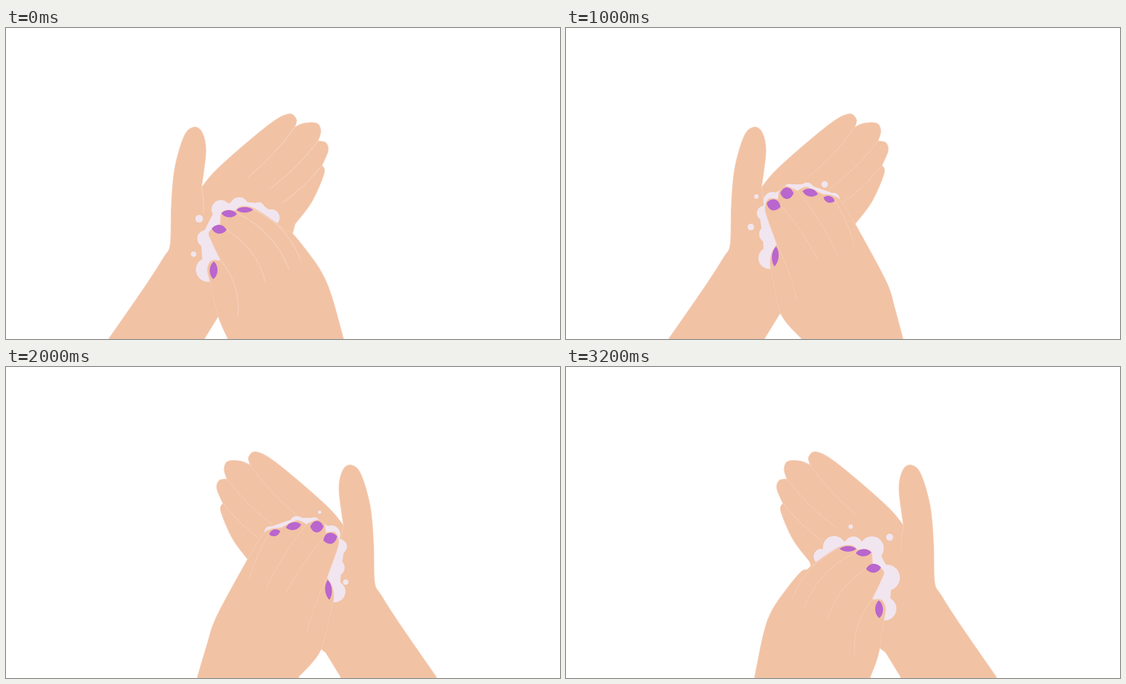
Recreate the animation shown at these times as an HTML page with a canvas. Size 998 px wide and 561 px high, loop 3400 ms.

```html
<!DOCTYPE html>
<html lang="en">
<head>
<meta charset="utf-8">
<title>Washing hands</title>
<style>
html, body { margin: 0; width: 100%; height: 100%; overflow: hidden; background: #fff; }
canvas { display: block; width: 998px; height: 561px; }
</style>
</head>
<body>
<canvas id="stage" width="998" height="561"></canvas>
<script>
const ctx = document.getElementById('stage').getContext('2d');
const SKIN = '#f1c2a3', LINE = '#f4cbb4', FOAM = '#f1e5ef', NAIL = '#b966ce';
const STEP = 200, MIRROR = 960, FLOOR = 575;

// Outlines are smooth curves through key points; "|" marks a sharp corner.
const palm = {
  outline: '185,561|252,464 284,414 296,390 298,320 304,253 321,195 338,179 353,188 360,222 352,288|' +
    '378,257 435,206 484,167 511,155 523,165 520,179|537,172 560,172 567,186 562,204|' +
    '576,207 580,222 569,248|573,262 551,313 521,353|490,430 384,517|357,561',
  lines: [[352, 288, 356, 333], [520, 179, 437, 268], [562, 204, 474, 291], [569, 248, 499, 315]]
};

// nails: x, y, angle, length, width; lines: start and end; blobs: foam centres
const bent = {
  outline: '400,561 382,519 367,455 363,437 367,423 375,419 388,421|372,388 366,368 386,354|' +
    '388,334 398,329 413,330|424,322 448,326 490,354 504,366|514,369 540,400 568,440 586,482 608,561',
  nails: [[374, 437, 1.6, 32, 14], [384, 363, .1, 27, 16], [402, 335, .05, 28, 13], [430, 328, 0, 30, 10]],
  lines: [[388, 421, 418, 519], [397, 364, 467, 457], [416, 334, 510, 436], [447, 328, 530, 417]],
  bulge: .2,
  blobs: [[364, 436], [360, 380], [387, 327], [420, 322], [455, 325], [478, 342]]
};
const flat = {
  outline: '425,561 388,517 372,450 368,428 370,408 380,390|362,340 359,322 366,308 382,309|' +
    '386,289 398,286 417,294|434,287 462,300|482,303 498,316 530,370 578,460 592,505 607,561',
  nails: [[377, 412, 1.65, 36, 12], [374, 319, .3, 26, 20], [398, 298, 0, 24, 21], [440, 297, .2, 28, 14], [474, 309, .3, 21, 12]],
  lines: [[380, 390, 416, 490], [387, 320, 454, 418], [417, 294, 490, 410], [484, 310, 520, 392]],
  bulge: .06,
  blobs: [[366, 415], [363, 372], [357, 334], [372, 312], [402, 291], [434, 291], [482, 308]]
};

// dx, dy move the washing hand, slide is the extra shift of its wrist
const pose = (hand, dx, dy, slide, size, seed, bubbles) => ({ hand, dx, dy, slide, size, seed, bubbles });
const flip = p => ({ ...p, flipped: true });
const rest = { ...pose(bent, 0, 0, 0, 19, 1.6, [[348, 344, 7], [338, 408, 5]]), crease: 2.6 };
const high = pose(flat, 0, 0, 0, 17, 1, [[466, 282, 6], [343, 304, 4], [333, 359, 6]]);
const out = pose(bent, 19, -15, 4, 20, 4.7, [[430, 275, 6], [370, 313, 5], [501, 307, 3]]);
const deep = pose(bent, 5, 13, -5, 21, 6, [[397, 294, 7], [417, 296, 4], [333, 374, 6]]);
const left = [rest, high, out, deep];

const highR = pose(flat, 2, -8, 6, 17, 1, [[395, 264, 3], [348, 390, 5]]);
const highR2 = { ...highR, seed: 3, bubbles: [[426, 259, 3], [348, 366, 4]] };
const deepR = pose(bent, 22, 2, -10, 24, 4.3, [[447, 290, 4], [377, 309, 6.5]]);
const right = [rest, rest, highR, out, deepR, rest, highR2, out, deepR].map(flip);

const cycle = [...left, ...left, ...right];

// Catmull-Rom curve through each run of points, closed below the stage
function outlinePath(text, warp = p => p) {
  const path = new Path2D();
  let first, last;
  for (const run of text.split('|')) {
    const p = run.split(' ').map(s => warp(s.split(',').map(Number)));
    if (last) p.unshift(last);
    else path.moveTo(...(first = p[0]));
    for (let i = 0; i < p.length - 1; i++) {
      const a = p[i - 1] || p[i], b = p[i], c = p[i + 1], d = p[i + 2] || c;
      path.bezierCurveTo(
        b[0] + (c[0] - a[0]) / 6, b[1] + (c[1] - a[1]) / 6,
        c[0] - (d[0] - b[0]) / 6, c[1] - (d[1] - b[1]) / 6, ...c);
    }
    last = p[p.length - 1];
  }
  path.lineTo(last[0], FLOOR + 20);
  path.lineTo(first[0], FLOOR + 20);
  path.closePath();
  return path;
}

function disc(x, y, r) {
  ctx.beginPath();
  ctx.arc(x, y, r, 0, 2 * Math.PI);
  ctx.fill();
}

function drawHand(path, lines, bulge, width) {
  ctx.fillStyle = SKIN;
  ctx.strokeStyle = LINE;
  ctx.fill(path);
  ctx.lineWidth = 1.3;
  ctx.stroke(path);
  ctx.lineWidth = width;
  for (const [x1, y1, x2, y2] of lines) {
    ctx.beginPath();
    ctx.moveTo(x1, y1);
    ctx.quadraticCurveTo((x1 + x2) / 2 + bulge * (y2 - y1), (y1 + y2) / 2 - bulge * (x2 - x1), x2, y2);
    ctx.stroke();
  }
}

// A band along the fingertips with puffs that shrink towards the little finger
function drawFoam(blobs, size, seed) {
  ctx.fillStyle = ctx.strokeStyle = FOAM;
  ctx.lineWidth = 18;
  ctx.beginPath();
  blobs.forEach(b => ctx.lineTo(...b));
  ctx.fill();
  ctx.stroke();
  blobs.forEach(([x, y], i) =>
    disc(x, y, Math.max(10, size * (1 - .07 * i) + 3 * Math.sin(seed + 2.4 * i))));
}

function drawNail([x, y, angle, length, width]) {
  const l = length / 2, h = width * 2 / 3;
  ctx.save();
  ctx.translate(x, y);
  ctx.rotate(angle);
  ctx.fillStyle = NAIL;
  ctx.beginPath();
  ctx.moveTo(-l, 0);
  ctx.bezierCurveTo(-l / 2, -h, l / 2, -h, l, 0);
  ctx.bezierCurveTo(l / 2, h, -l / 2, h, -l, 0);
  ctx.fill();
  ctx.restore();
}

function draw({ hand, dx, dy, slide, size, seed, bubbles, crease = 1.5, flipped }) {
  ctx.setTransform(1, 0, 0, 1, 0, 0);
  ctx.fillStyle = '#fff';
  ctx.fillRect(0, 0, 998, 561);
  if (flipped) ctx.setTransform(-1, 0, 0, 1, MIRROR, -2);
  ctx.lineCap = ctx.lineJoin = 'round';

  drawHand(outlinePath(palm.outline), palm.lines, .07, crease);
  ctx.fillStyle = FOAM;
  bubbles.forEach(b => disc(...b));

  ctx.translate(dx, dy);
  drawFoam(hand.blobs, size, seed);
  const warp = ([x, y]) => {
    const t = Math.max(0, (y - 430) / 131);
    return [x + slide * t, y - dy * t];
  };
  drawHand(outlinePath(hand.outline, warp), hand.lines, hand.bulge, crease);
  hand.nails.forEach(drawNail);
}

const start = performance.now();
let shown = -1;
function tick() {
  const i = Math.floor((performance.now() - start) / STEP) % cycle.length;
  if (i !== shown) draw(cycle[shown = i]);
  requestAnimationFrame(tick);
}
tick();
</script>
</body>
</html>
```
